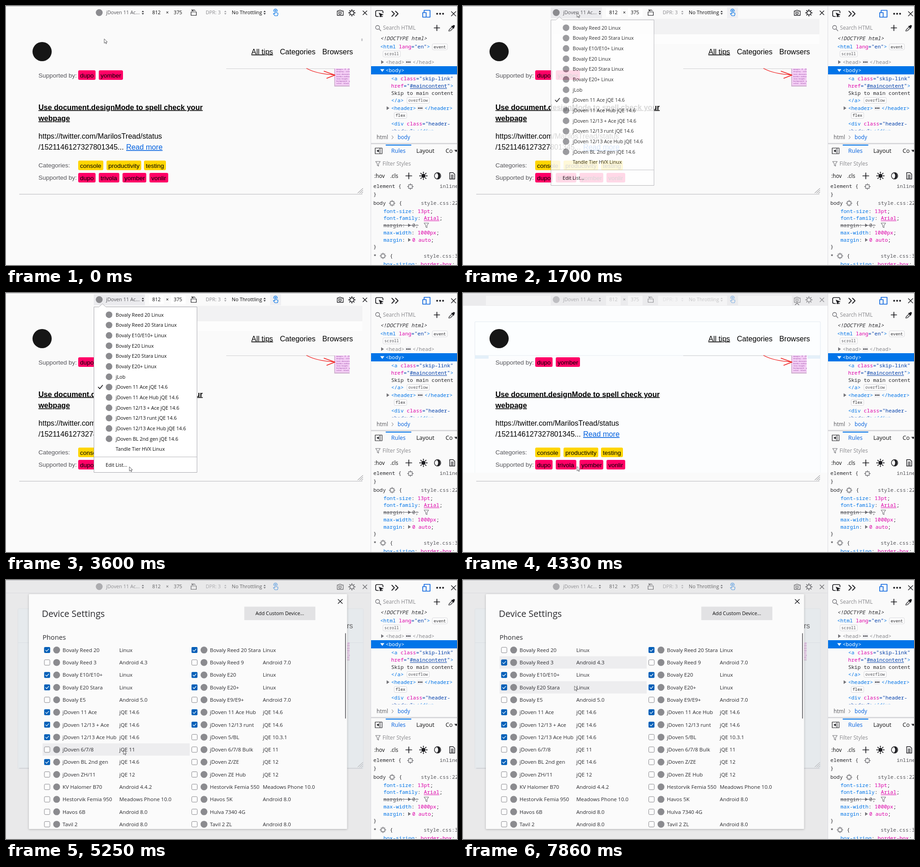
An HTML page for the animation above (8 s loop, 987x568 px).

```html
<!DOCTYPE html>
<html lang="en">
<head>
<meta charset="utf-8">
<title>Device settings</title>
<style>
html, body { margin: 0; width: 100%; height: 100%; overflow: hidden; background: #fafafa; }
svg { display: block; width: 987px; height: 568px; }
text { white-space: pre; fill: #0c0c0d; font: 10.8px "Open Sans", "Noto Sans", sans-serif; }
text.p { font: 13.5px "Liberation Sans", Arial, sans-serif; fill: #000; }
text.big { font-size: 16.1px; }
text.bold { font-weight: bold; }
text.list { font-size: 11.45px; fill: #2a2a2e; }
text.mid { font-size: 11.7px; }
text.tab { font-size: 12.5px; }
text.menu { font-size: 10.7px; }
text.c { font: 11.33px "Noto Sans Mono", "DejaVu Sans Mono", monospace; fill: #2a2a2e; }
text.slant { font-style: italic; }
text.badge { font-size: 8.9px; }
text.tiny { font-size: 3.8px; fill: #8d3a9c; }
.u { text-decoration: underline; }
.gray, text.gray { fill: #8a8a8e; }
.soft, text.soft { fill: #55555a; }
.blue, text.blue { fill: #0060df; }
.b { fill: #0074e8; } .m { fill: #dd00a9; } .v { fill: #003eaa; } .w { fill: #fff; } .g { fill: #87878b; }
.line { fill: none; stroke: #1c1c20; stroke-width: 1.4; stroke-linecap: round; stroke-linejoin: round; }
</style>
</head>
<body>
<script>
const LOOP = 8000;
const esc = s => s.replace(/&/g, "&amp;").replace(/</g, "&lt;");
const text = (x, y, s, cls = "") => `<text x="${x}" y="${y}" class="${cls}">${esc(s)}</text>`;
const rect = (x, y, w, h, fill, more = "") => `<rect x="${x}" y="${y}" width="${w}" height="${h}" fill="${fill}" ${more}/>`;
const dot = (x, y, r, fill) => `<circle cx="${x}" cy="${y}" r="${r}" fill="${fill}"/>`;
const path = (d, more = "") => `<path d="${d}" ${more}/>`;
const line = (d, more = "") => path(d, `class="line" ${more}`);
const group = (id, body) => `<g id="${id}">${body}</g>`;
// Coloured code: parts split by "|", the first letter of each is its colour class
const code = (x, y, s) => `<text x="${x}" y="${y}" class="c">` +
  s.split("|").map(p => `<tspan class="${p[0]}">${esc(p.slice(1))}</tspan>`).join("") + "</text>";
const badge = (x, y, w, s, cls = "") =>
  rect(x, y - 6.5, w, 13, "#fdfdfd", 'rx="2.5" stroke="#cfcfd4" stroke-width=".8"') + text(x + 3, y + 3, s, "c badge " + cls);
const dots = (x, y) => rect(x, y - 5, 13, 10, "#ededf0", 'rx="2.5"') + [3, 6.5, 10].map(d => dot(x + d, y, 1.3, "#1c1c20")).join("");
const cross = (x, y, r) => line(`M${x - r} ${y - r}l${2 * r} ${2 * r}m0 ${-2 * r}l${-2 * r} ${2 * r}`);
const plus = (x, y, r) => line(`M${x - r} ${y}h${2 * r}M${x} ${y - r}v${2 * r}`, 'style="stroke-width:1.7"');
const arrows = (x, y, fill = "#2a2a2e") => path(`M${x - 2.5} ${y - 1.2}l2.5 -3 2.5 3zm0 2.4l2.5 3 2.5 -3z`, `fill="${fill}"`);
const right = (x, y) => path(`M${x} ${y - 4}l6 4 -6 4z`, 'fill="#737378"');
const funnel = (x, y) => line(`M${x - 5} ${y - 5}h10l-3.6 5v5l-2.8 -1.5v-3.5z`, 'style="stroke:#737378;stroke-width:1.1"');
const target = (x, y) => line(`M${x - 4} ${y - 4}h8v8h-8zM${x} ${y - 6.5}v3m0 7v3M${x - 6.5} ${y}h3m7 0h3`, 'style="stroke:#737378;stroke-width:1.3"');
const rays = (x, y, r, n, w) => Array.from({ length: n }, (_, i) => {
  const a = i * 2 * Math.PI / n, c = Math.cos(a), s = Math.sin(a);
  return line(`M${x + c * r} ${y + s * r}L${x + c * (r + 2)} ${y + s * (r + 2)}`, `style="stroke-width:${w}"`);
}).join("");
const ICON = "#8b8b8f";

function toolbar() {
  return dot(204, 14.5, 7.5, ICON) + text(219, 18.3, "jDoven 11 Ac...", "soft") + arrows(299.5, 14.5) +
    text(320, 18.3, "812") + text(350, 18.3, "×") + text(367, 18.3, "375") +
    line("M405 13h11.5v7.5h-11.5zM407 10.5a4 3 0 0 1 7 -.5M407 7.5v3h3", 'style="stroke-width:1.2"') +
    text(437, 18.3, "DPR: 3", "gray") + arrows(480, 14.5, "#9a9a9e") +
    text(494, 18.3, "No Throttling") + arrows(566, 14.5) +
    line("M588.5 17v-6.5a1.3 1.3 0 0 1 2.6 0v4l4 1v3l-1.3 3h-5.3l-3.5 -4.5 1.2 -.8zM586 12a4 4 0 1 1 7.5 0", 'style="stroke:#0074e8;stroke-width:1.2"') +
    line("M725 11h3l1 -1.7h4l1 1.7h4v9.5h-13z", 'style="stroke-width:1.3"') +
    '<circle cx="731" cy="15.5" r="2.6" class="line"/>' +
    '<circle cx="757" cy="15" r="4.2" class="line"/>' + rays(757, 15, 5, 8, 1.8) + cross(785.5, 15, 4.3);
}

function tag(x, y, w, s, fill) {
  return rect(x, y - 10.5, w, 21, fill, 'rx="3"') + text(x + 4, y + 5, s, "p");
}

function page() {
  const pink = "#ff0066", gold = "#ffd500";
  const css = ["margin: 0 .25", "display: inli", "text-decorati", "border-radius", "line-height: ", "background: g", "color: black;"];
  return dot(79, 100, 21, "#161616") +
    text(537, 105.5, "All tips", "p big u") + text(599.5, 105.5, "Categories", "p big") + text(692.3, 105.5, "Browsers", "p big") +
    rect(482, 137, 270, 1, "#cfcfd2") +
    rect(718.5, 137, 33.5, 39.5, "#c9a9c9") + rect(720, 137, 32, 37.5, "#f4cef5") +
    css.map((s, i) => text(723, 140.3 + i * 5.1, s, "c tiny")).join("") +
    line("M658 137Q680 149 719 151M696 143L720 151.5 702 158.5", 'style="stroke:#f01818;stroke-width:1.4"') +
    text(71, 156.6, "Supported by:", "p soft") + tag(158, 151.5, 38, "dupo", pink) + tag(203, 151.5, 53, "yomber", pink) +
    text(71, 227.5, "Use document.designMode to spell check your", "p big bold u") + text(71, 252, "webpage", "p big bold u") +
    text(71, 290.7, "https://twitter.com/MarilosTread/status", "p big") + text(71, 315, "/1521146127327801345...", "p big") +
    text(263, 315, "Read more", "p big u blue") +
    text(71, 354, "Categories:", "p soft") +
    tag(158, 349.5, 55, "console", gold) + tag(220, 349.5, 76, "productivity", gold) + tag(302, 349.5, 48, "testing", gold) +
    text(71, 381.3, "Supported by:", "p soft") + tag(158, 376.5, 38, "dupo", pink) + tag(203, 376.5, 45, "trivola", pink) +
    tag(255, 376.5, 52, "yomber", pink) + tag(314, 376.5, 41, "vonlir", pink) +
    rect(29, 412.3, 751, 1, "#b4b4b8") + line("M770 410l11 -10M774 410.5l7 -6.5M778 411l3 -3", 'style="stroke:#77777b;stroke-width:1"');
}

function markup() {
  return line("M824 23h-6M815 23h-3a3 3 0 0 1 -3 -3v-7a3 3 0 0 1 3 -3h10a3 3 0 0 1 3 3v2", 'style="stroke-width:1.7"') +
    path("M815.5 14.5l11 4.5 -4.5 1.5 -2 4.5z", 'fill="#1c1c20"') +
    line("M844.5 11.5l5.5 5.5 -5.5 5.5m8 -11l5.5 5.5 -5.5 5.5", 'style="stroke-width:1.8"') +
    line("M915 14v-4.5h13v15h-7M912 14.5h7.5v10h-7.5z", 'style="stroke:#0060df;stroke-width:1.6"') +
    [943.5, 950, 956.5].map(x => dot(x, 17, 2, "#1c1c20")).join("") + cross(979.5, 17, 4.8) +
    line("M816.5 50.5l4 4M817.5 47a4.3 4.3 0 1 1 -8.6 0a4.3 4.3 0 1 1 8.6 0", 'style="stroke:#737378"') +
    text(825, 52.4, "Search HTML", "mid gray") + plus(943, 48, 6) +
    line("M969 55l1 -3 6 -6 2.5 2.5 -6 6z", 'style="stroke-width:1.2"') + path("M974 44l6 6 1 -2.5 1.5 -4.5 -2.5 -1.5 -3 2z", 'fill="#1c1c20"') +
    text(819, 75, "<!DOCTYPE html>", "c slant") +
    code(819, 93, 'b<html|m lang|v="en"|b>') + badge(933, 89.5, 33, "event") + badge(825, 105, 38, "scroll", "soft") +
    right(821, 123) + code(831, 127, "g<head>") + dots(874, 123) + code(890, 127, "g</head>") +
    rect(799, 132, 188, 18, "#0074e8") + path("M819 138.5h9l-4.5 6z", 'fill="#fff"') + code(831, 145, "w<body>") +
    code(843, 163, 'b<a|m class|v="skip-link"') +
    code(843, 179, 'mhref|v="#maincontent"|b>') + rect(884, 180.5, 81, 1, "#003eaa") +
    text(843, 195, "Skip to main content", "c") + code(843, 211, "b</a>") + badge(877.5, 207, 49, "overflow", "soft") +
    right(833, 224) + code(843, 228, "b<header>") + dots(900, 224) + code(916, 228, "b</header>") + badge(849.5, 240, 27.5, "flex") +
    code(843, 262, 'b<div|m class|v="header-') +
    `<g clip-path="url(#fold)">${code(843, 278, 'vshadow"|b></div>')}</g>` +
    text(811, 292, "html", "mid soft") + line("M844.5 284.5l3 3.5 -3 3.5", 'style="stroke:#8a8a8e;stroke-width:1.1"') + text(857, 292, "body", "mid blue") +
    rect(799, 300.5, 188, 2.5, "#d4d4d8") + rect(831, 304, 56, 2, "#0074e8");
}

function rules() {
  const rule = (y, name, value) => code(826, y, `b${name}|c: |m${value}|c;`);
  return line("M808 311.5h15v12.5h-15zM818.5 311.5v12.5", 'style="stroke-width:1.2"') + path("M816 314.5v6.5l-5 -3.2z", 'fill="#1c1c20"') +
    text(843, 322.3, "Rules", "tab blue") + text(898, 322.3, "Layout", "tab") + text(962, 322.3, "Co", "tab") + path("M981 315.5h8l-4 5z", 'fill="#2a2a2e"') +
    funnel(814, 346) + text(824, 350.3, "Filter Styles", "mid gray") +
    text(806, 377, ":hov", "mid") + text(841, 377, ".cls", "mid") + plus(881.5, 372.5, 6.5) +
    dot(913.5, 372.5, 4.5, "#1c1c20") + rays(913.5, 372.5, 6.2, 8, 1.8) +
    '<circle cx="944.5" cy="372.5" r="7" class="line"/>' + path("M943 365.5a7 7 0 0 1 0 14a9 9 0 0 0 0 -14z", 'fill="#1c1c20" stroke="#1c1c20"') +
    line("M971 365.5h7.5l3.5 3.5v10.5h-11zM974 371h5M974 374h5M974 377h5") +
    text(804, 399, "element {", "c") + target(885, 396) + text(949, 399, "inline", "c soft") + text(804, 416.5, "}", "c") +
    text(804, 436, "body", "c") + target(845, 432.5) + text(860, 436, "{", "c") + text(908, 436, "style.css:22", "c soft") +
    rule(453.5, "font-size", "13pt") + rule(469, "font-family", "Arial") + rect(914.5, 470.5, 34, 1, "#dd00a9") +
    text(826, 485, "margin:", "c soft") + right(880, 481) + text(889, 485, "0;", "c soft") + rect(826, 480.5, 77, 1, "#55555a") + funnel(920, 481) +
    rule(501, "max-width", "1000px") + code(826, 517, "bmargin|c:") + right(880, 513) + code(889, 517, "m0 auto|c;") +
    text(804, 532, "}", "c") + text(804, 552, "*", "c") + target(825, 548) + text(840, 552, "{", "c") + text(914, 552, "style.css:3", "c soft") +
    rule(569.5, "box-sizing", "border-box");
}

function menu() {
  const rows = ["Bovaly Reed 20 Linux", "Bovaly Reed 20 Stara Linux", "Bovaly E10/E10+ Linux", "Bovaly E20 Linux", "Bovaly E20 Stara Linux",
    "Bovaly E20+ Linux", "jLob", "jDoven 11 Ace jQE 14.6", "jDoven 11 Ace Hub jQE 14.6", "jDoven 12/13 + Ace jQE 14.6",
    "jDoven 12/13 runt jQE 14.6", "jDoven 12/13 Ace Hub jQE 14.6", "jDoven BL 2nd gen jQE 14.6", "Tandle Tier HVX Linux"];
  return path("M192.5 30.5H203.5L211 23.5 218.5 30.5H418V393.5H192.5Z", 'fill="#fff" stroke="#a9a9ae"') +
    rows.map((s, i) => {
      const y = 47.7 + i * 22.67;
      return (i < 13 ? dot(225.5, y, 7.2, ICON) : "") + text(240, y + 4, s, "menu");
    }).join("") +
    line("M202 206.5l3.2 3.5 6 -7.5", 'style="stroke-width:1.8"') + rect(193, 359, 225, 1, "#b8b8bc") + text(218, 380.7, "Edit List...", "menu");
}

const ROW = 27.29, TOP = 153.6;
const rowY = i => TOP + i * ROW;
const box = (x, y) => rect(x + .5, y - 6, 12, 12, "#fdfdfd", 'rx="2" stroke="#85858a"');
const tick = (x, y) => rect(x, y - 6.5, 13, 13, "#005fb8", 'rx="2"') +
  line(`M${x + 3.2} ${y + .3}l2.4 2.5 4.4 -5`, 'style="stroke:#fff;stroke-width:1.2"');

function dialog() {
  // A leading "*" marks a device that is switched on
  const left = ["Bovaly Reed 20,Linux", "Bovaly Reed 3,Android 4.3", "*Bovaly E10/E10+,Linux", "*Bovaly E20 Stara,Linux", "Bovaly E5,Android 5.0",
    "*jDoven 11 Ace,jQE 14.6", "*jDoven 12/13 + Ace,jQE 14.6", "*jDoven 12/13 Ace Hub,jQE 14.6", "jDoven 6/7/8,jQE 11", "*jDoven BL 2nd gen,jQE 14.6",
    "jDoven ZH/11,jQE 12", "KV Halomer B70,Android 4.4.2", "Hestorvik Femia 950,Meadows Phone 10.0", "Havos 6B,Android 8.0", "Tavil 2,Android 8.0"];
  const other = ["*Bovaly Reed 20 Stara,Linux", "Bovaly Reed 9,Android 7.0", "*Bovaly E20,Linux", "*Bovaly E20+,Linux", "Bovaly E9/E9+,Android 7.0",
    "*jDoven 11 Ace Hub,jQE 14.6", "*jDoven 12/13 runt,jQE 14.6", "jDoven 5/BL,jQE 10.3.1", "jDoven 6/7/8 Bulk,jQE 11", "jDoven Z/ZE,jQE 12",
    "jDoven ZE Hub,jQE 12", "Hestorvik Femia 550,Meadows Phone 10.0", "Havos 5K,Android 8.0", "Hulva 7340 4G,", "Tavil 2 ZL,Android 8.0"];
  const column = (rows, x, osX) => rows.map((s, i) => {
    const y = rowY(i), on = s[0] === "*", [name, os] = s.replace("*", "").split(",");
    return (on ? tick(x, y) : box(x, y)) + dot(x + 27.3, y, 7.5, ICON) + text(x + 40.3, y + 4.2, name, "list") + text(osX, y + 4.2, os, "list");
  }).join("");
  const band = id => rect(80, rowY(0) - 13.6, 322, 27, "#ededef", `id="${id}"`);
  return rect(50, 31, 696.5, 515, "#fbfbfb", 'rx="1.5" style="filter:drop-shadow(0 1px 2px rgba(0,0,0,.25))"') +
    `<text x="78.5" y="80.5" style="font-size:19.6px;fill:#2a2a2e">Device Settings</text>` +
    `<text x="80" y="131" style="font-size:14.7px;fill:#2a2a2e">Phones</text>` +
    rect(521.5, 58.5, 155.5, 29.5, "#e2e2e4") + text(546, 77.3, "Add Custom Device...") + cross(731.5, 47, 4.6) +
    rect(742, 116.5, 2, 187.5, "#77777b", 'rx="1"') + band("hover") + band("stuck") +
    column(left, 83.5, 248) + column(other, 406, 562) + group("tick0", tick(83.5, rowY(0))) + group("tick1", tick(83.5, rowY(1)));
}

const refresh = rect(197, 28, 583, 34, "#f2f2f3") + rect(197, 62, 583, 21, "#fdfdfd");
const pressed = rect(192, 3, 112, 24, "#ebebee") + rect(197, 28, 21, 5, "#fdfdfd") + rect(313, 5, 32, 19, "#fff") +
  rect(361, 5, 32, 19, "#fff") + rect(578, 3, 24, 24, "#efeff2");
const sheet = rect(26, 63, 756, 351, "#f5fbff", 'rx="2" stroke="#e3ebf1"') + rect(26, 137, 756, 1, "#dfe7ee");
const head = rect(0, 28, 798, 366, "#fcfdfe") + line("M26 394V63H782V394", 'style="stroke:#eef2f6;stroke-width:1"') +
  rect(26, 63, 756, 74, "#fcfeff", 'rx="2" stroke="#e6ecf2"') +
  rect(26, 137, 30, 7, "#e4f0f9") + rect(754, 137, 28, 7, "#e4f0f9");
const flash = rect(0, 2, 798, 26, "#e2e2e5", 'opacity=".6"') +
  [[50, 142], [313, 32], [361, 32], [427, 151], [602, 118]].map(([x, w]) => rect(x, 6, w, 21, "#fdfdfd", 'opacity=".5"')).join("") +
  line("M727 26l4 -4 4 4", 'style="stroke:#77777b"');

document.body.innerHTML = `<svg viewBox="0 0 987 568">
  <defs><clipPath id="fold"><rect x="799" y="264" width="188" height="8.5"/></clipPath></defs>
  ${rect(0, 0, 987, 568, "#fafafa")}
  ${group("refresh", refresh)}${group("pressed", pressed)}${group("head", head)}${group("sheet", sheet)}
  ${group("scroll", rect(777.5, 71, 3, 6, "#c4c4c8", 'rx="1.5"'))}
  ${toolbar()}${page()}
  ${group("menu", menu())}${group("flash", flash)}
  ${group("dim", rect(0, 1, 798, 567, "#d4d4d8", 'opacity=".45"') + rect(0, 28, 798, 1, "#dcdce0"))}
  ${group("dialog", dialog())}
  ${rect(0, 0, 987, 1, "#bdbdc2")}
  ${rect(798, 1, 189, 567, "#fafafa")}${rect(798, 1, 1, 567, "#dcdce0")}
  ${markup()}${rules()}
  ${group("cursor", path("M0 0V9.6L2.3 7.6 3.9 11 5.3 10.3 3.8 7H6.9Z", 'fill="#fff" stroke="#3a3a3e" stroke-width=".8"'))}
</svg>`;

// Held steps: [time in ms, value]
function play(id, prop, steps) {
  const frames = steps.map(([t, v]) => ({ offset: t / LOOP, [prop]: v, easing: "step-end" }));
  frames.push({ offset: 1, [prop]: steps.at(-1)[1] });
  document.getElementById(id).animate(frames, { duration: LOOP, iterations: Infinity });
}
const show = (id, ...steps) => play(id, "opacity", steps[0][0] ? [[0, 0], ...steps] : steps);

const moves = [
  [0, 215, 72], [740, 221, 64], [880, 230, 49], [1010, 239, 33], [1150, 245, 22], [1290, 248, 17], [1430, 249.5, 15],
  [2280, 256.5, 90], [2430, 250, 172], [2570, 238, 256], [2720, 228, 322], [2870, 258, 366], [3010, 297, 380],
  [3600, 270, 381], [3750, 249.5, 380.5],
  [5250, 257, 373], [5390, 269, 346], [5540, 262, 306], [5680, 238, 262], [5830, 200, 218], [5970, 160, 180], [6120, 130, 158], [6260, 114, 150],
  [6410, 95, 149], [6720, 92, 149], [6860, 90, 150], [7000, 89, 158], [7140, 88, 168], [7290, 88, 176], [7430, 89, 177], [7570, 108, 190], [7710, 137, 206],
  [7860, 244, 232.5]
];
play("cursor", "transform", moves.map(([t, x, y]) => [t, `translate(${x}px, ${y}px)`]));
const rowAt = y => Math.floor((y - TOP) / ROW + .5);
play("hover", "transform", [[0, "none"], ...moves.filter(m => m[0] >= 5250).map(([t, , y]) => [t, `translate(0px, ${rowAt(y) * ROW}px)`])]);
play("stuck", "transform", [[0, `translate(0px, ${ROW}px)`]]);

show("scroll", [0, 1], [740, 0]);
show("refresh", [740, 1], [4330, 0]);
show("pressed", [1150, 1], [4330, 0]);
show("menu", [1700, .85], [1820, 1], [4330, 0]);
show("head", [4330, 1], [4480, 0]);
show("flash", [4330, 1], [4480, 0]);
show("sheet", [4480, 1]);
show("dim", [4480, 1]);
show("dialog", [4480, .9], [4600, 1]);
play("dialog", "transform", [[0, "translate(0px, .5px)"], [4600, "none"]]);
show("hover", [5250, 1]);
show("stuck", [7860, 1]);
show("tick0", [0, 1], [6860, 0]);
show("tick1", [7430, 1]);
</script>
</body>
</html>
```
